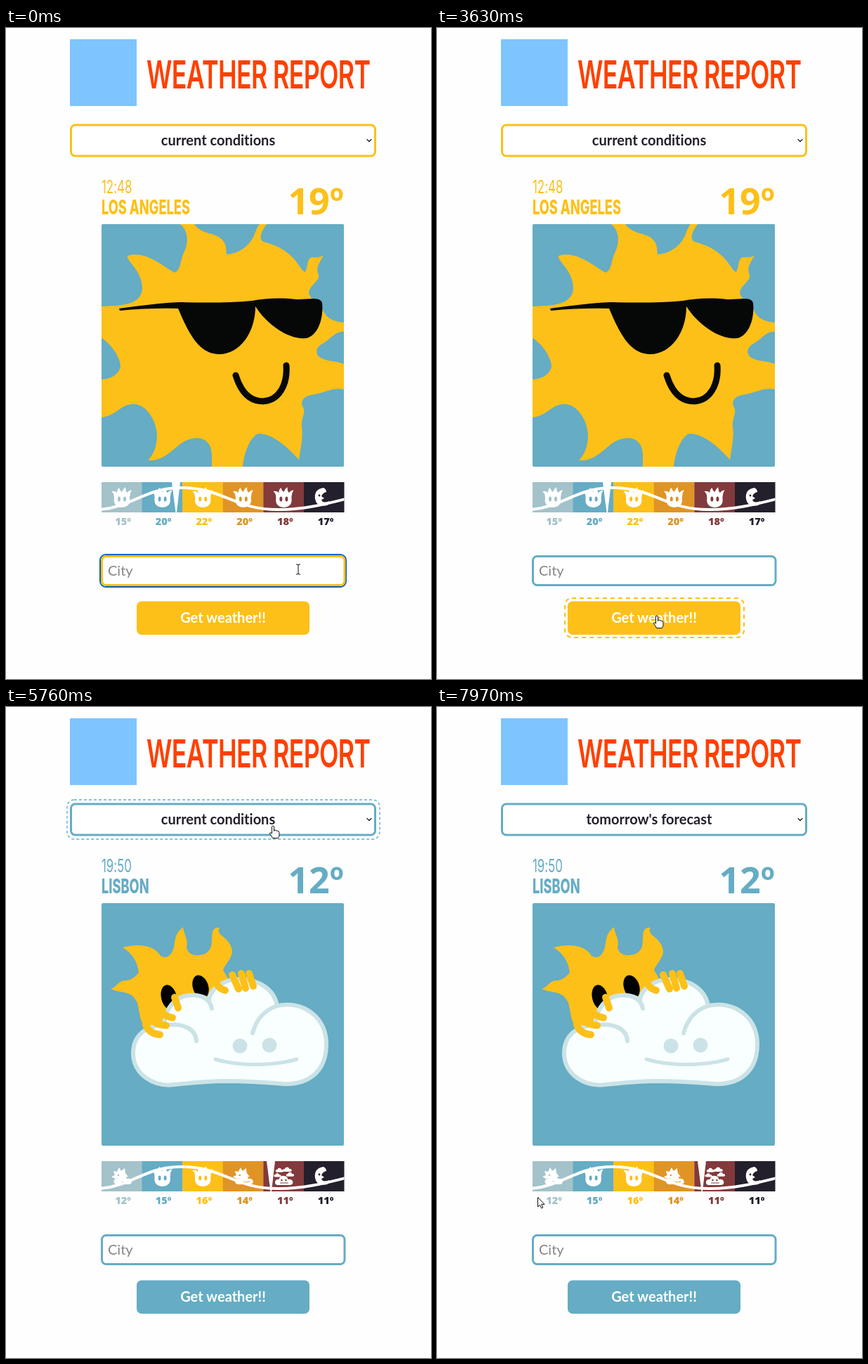
Recreate the animation shown at these times as an HTML page. Size 605 by 926 pixels, loop 8 s.

```html
<!DOCTYPE html>
<html lang="en">
<head>
<meta charset="utf-8">
<title>Weather Report</title>
<style>
  html, body { margin: 0; width: 100%; height: 100%; overflow: hidden; background: #fefefe; }
  svg { display: block; --accent: #fdc018; }
  text { font-family: Lato, sans-serif; font-variant-ligatures: none; white-space: pre; }
  .mid { text-anchor: middle; }
  /* condensed face */
  .narrow { font-family: Inter, sans-serif; transform: scaleX(.65); transform-box: fill-box; transform-origin: 0 0; }
  .title { font-size: 55px; font-weight: 600; letter-spacing: -1px; fill: #ff4000; }
  .clock { font-size: 26px; }
  .city { font-size: 28px; font-weight: 800; }
  .temp { font: 700 52px "Open Sans", sans-serif; text-anchor: end; }
  .small { font: 800 14.5px "Open Sans", sans-serif; text-anchor: middle; }
  .bold { font-weight: 700; font-size: 20px; }
  .item { font: 700 18px "Open Sans", sans-serif; }
  .accent { fill: var(--accent); }
  .frame { fill: #fff; stroke: var(--accent); stroke-width: 3; }
  .dash { fill: none; stroke: var(--accent); }
  .cursor path { fill: #fff; stroke: #111; stroke-linejoin: round; }
  .line { fill: none; stroke-linecap: round; }
</style>
</head>
<body>
<svg id="stage" width="605" height="926" viewBox="0 0 605 926">
  <defs>
    <clipPath id="card"><rect x="136" y="279" width="345" height="345" rx="2"/></clipPath>
    <clipPath id="strip"><rect x="136" y="646" width="345.5" height="43.5"/></clipPath>
    <g id="sun">
      <path fill="#fff" d="M-11 0Q-11-6-15-9Q-10-10-7-7Q-7-12-4-14Q-3-10 0-8Q2-13 5-15Q5-10 7-7Q10-10 14-11Q11-6 11 0Q13 13 0 14Q-13 13-11 0Z"/>
      <ellipse cx="-4" cy="2" rx="2" ry="3.6" fill="currentColor"/>
      <ellipse cx="4" cy="2" rx="2" ry="3.6" fill="currentColor"/>
    </g>
    <path id="puff" fill="#fff" d="M-9 6Q-14 5-12 0Q-10-3-7-2Q-5-8 0-7Q5-7 6-2Q12-3 13 2Q13 6 8 6Z"/>
    <g id="peek">
      <path fill="#fff" d="M-10 3L-15 0-10-2-12-8-7-7-4-13-1-8 4-12 5-5 9 0Z"/>
      <circle cx="-5" cy="-2" r="1.3" fill="currentColor"/>
      <use href="#puff" x="1" y="5"/>
      <path class="line" stroke="currentColor" d="M0 7Q5 9 9 7"/>
    </g>
    <g id="rain">
      <use href="#puff" transform="translate(-6-9)scale(.45)"/>
      <use href="#puff" transform="translate(5-10)scale(.5)"/>
      <use href="#puff" transform="translate(-9-2)scale(.4)"/>
      <use href="#puff" transform="translate(9-3)scale(.45)"/>
      <use href="#puff" y="6"/>
      <circle cx="-3" cy="5" r="1.3" fill="currentColor"/>
      <circle cx="3" cy="5" r="1.3" fill="currentColor"/>
      <path class="line" stroke="currentColor" d="M-5 9H6"/>
    </g>
    <g id="moon">
      <path fill="#fff" d="M3-14Q-11-12-9 2Q-7 14 8 11Q12 9 11 5Q2 9 0 3L4 1 0-2Q2-7 7-8Q7-12 3-14Z"/>
      <circle cx="-3" cy="-3" r="1.4" fill="currentColor"/>
    </g>
  </defs>

  <rect x="91" y="16" width="95" height="95" fill="#7ec4ff"/>
  <text class="narrow title" x="200" y="86">WEATHER REPORT</text>

  <rect id="pickDash" class="dash" x="87" y="132" width="445" height="56" rx="10"/>
  <rect class="frame" x="92.5" y="138" width="433" height="44" rx="6"/>
  <text id="choice" class="bold mid" x="302" y="167" fill="#241f2c"></text>
  <path class="line" stroke="#222" stroke-width="1.3" d="M514 158.500l3 3 3-3"/>

  <g id="report"></g>

  <rect id="ring" x="134" y="749" width="350" height="46" rx="8" fill="none" stroke="#0a5fc4" stroke-width="2"/>
  <rect id="field" class="frame" x="136.5" y="751.5" width="345.5" height="41" rx="6"/>
  <text id="entry" x="145" y="779" font-size="20"></text>
  <path id="caret" d="M197.500 762V784" stroke="#111"/>

  <rect id="goDash" class="dash" x="182" y="811" width="255" height="56" rx="10" stroke-width="2" stroke-dasharray="6 5"/>
  <g id="go">
    <rect class="accent" x="186" y="815.5" width="246" height="47.500" rx="7"/>
    <text class="bold mid" x="309" y="846" fill="#fff">Get weather!!</text>
  </g>

  <g id="menu">
    <rect x="92.500" y="186" width="436" height="82" rx="2" fill="#000" opacity=".2"/>
    <rect x="92" y="186" width="435.5" height="81" rx="2" fill="#000" opacity=".35"/>
    <rect x="90.500" y="184.500" width="435.5" height="80.500" rx="2" fill="#fff" stroke="#666"/>
    <rect class="row" x="91" y="187.500" width="434.500" height="37.500"/>
    <rect class="row" x="91" y="225" width="434.500" height="37.500"/>
    <text class="item" x="96" y="214">current conditions</text>
    <text class="item" x="96" y="251">tomorrow's forecast</text>
  </g>

  <g id="cursor" class="cursor">
    <path d="M.5.5V14L3.500 11.300 5.700 16 7.800 15 5.700 10.400H10Z"/>
    <path d="M-1.500 1Q0-1 1.500 1V7.500L2 6Q4 5.500 4.500 7Q6.500 6 7 8Q9 7.500 9 9.500V13Q9 15 7.500 17.500H-.5Q-1.500 15-4.500 11Q-4.500 8.500-1.500 11Z"/>
    <path style="fill:none" d="M-3-7H-1L0-6 1-7H3M0-6V6M-3 7H-1L0 6 1 7H3"/>
  </g>
</svg>

<script>
const $ = id => document.getElementById(id);
const YELLOW = [253, 192, 24], BLUE = [101, 172, 196];
const CELLS = ['#a3c2ca', '#65acc4', '#fdc018', '#e09425', '#823a3c', '#241f2c'];

const sunny = `
  <rect x="136" y="279" width="345" height="345" fill="#fdc018"/>
  <g fill="#65acc4">
    <path d="M248 279C259 288 261 304 253 320C248 330 249 345 240 348C222 338 198 316 173 324C170 330 194 345 194 370C193 394 165 395 136 396V279Z"/>
    <path d="M268 279C280 296 300 289 310 304C314 310 313 316 314 322C334 321 349 307 354 293Q357 284 361 279Z"/>
    <path d="M371 279C362 291 360 300 366 304C388 309 406 320 418 339Q423 347 426 347C431 338 428 327 436 326Q444 327 452 324C444 336 441 343 445 351C447 361 432 364 431 378L436 386L449 395C452 408 460 417 481 419V279Z"/>
    <path d="M481 432C468 431 462 443 449 450C440 455 441 464 446 468C456 475 470 473 481 478Z"/>
    <path d="M136 441C149 449 162 467 163 481C161 493 149 499 136 500Z"/>
    <path d="M136 554C158 551 163 535 181 535C202 535 215 562 215 580C215 596 209 608 202 615C226 617 239 596 254 588C276 577 293 586 293 608V624H136Z"/>
    <path d="M337 624C339 602 350 577 361 577C379 578 398 593 417 614C420 594 423 583 421 566C420 554 428 547 422 538C419 527 427 523 440 521C455 518 466 511 481 514V624Z"/>
  </g>
  <path fill="#050807" d="M161 399C190 395 220 391 247 390C285 391 320 391 350 388C368 385 387 383 413 386C428 387 447 381 450 391C452 408 447 435 429 441C405 445 372 423 355 396C355 433 333 465 302 464C274 463 260 434 245 399Q205 398 162 402Z"/>
  <path class="line" stroke="#050807" stroke-width="9" d="M327 494C335 520 349 531 366 531C388 530 401 508 399 480"/>`;

const cloudy = `
  <rect x="136" y="279" width="345" height="345" fill="#65acc4"/>
  <path fill="#fdc018" d="M149 401C160 397 159 389 172 389Q179 389 189 378C187 361 179 350 166 342C190 336 211 339 220 354Q228 359 234 352C244 341 235 326 252 313C253 324 260 330 257 342C259 354 273 355 283 351C299 343 289 325 296 316Q299 313 304 314C297 325 320 327 322 347C322 358 312 365 309 374L330 410 220 470 199 457C190 447 191 436 187 421C178 402 168 409 149 401Z"/>
  <ellipse cx="232" cy="413" rx="11" ry="18" transform="rotate(-14 232 413)"/>
  <ellipse cx="277" cy="398" rx="11" ry="17" transform="rotate(-18 277 398)"/>
  <g class="line" stroke="#cbe3e6" stroke-width="6">
    <path fill="#f9ffff" d="M240 537C212 541 181 524 181 492C181 468 199 452 225 453C227 424 245 409 267 410Q280 410 289 417C291 398 313 387 334 387C361 388 382 402 386 425C423 417 456 441 456 480C456 516 433 538 394 536C360 533 340 532 308 532C280 533 260 535 240 537Z"/>
    <path d="M225 453C249 449 270 456 271 475M267 410C282 411 291 418 293 429M386 425Q359 434 351 464"/>
    <path stroke-width="5" d="M298 501C330 511 380 511 414 501"/>
  </g>
  <circle cx="333" cy="482" r="10.500" fill="#cbe3e6"/>
  <circle cx="375" cy="481" r="10.500" fill="#cbe3e6"/>
  <g class="line" stroke="#fdc018" stroke-width="10">
    <path d="M199 452Q204 465 219 466M205 444Q214 452 228 453M218 429Q224 440 237 442M240 413L245 428"/>
    <path d="M298 389Q302 401 312 403M322 381L331 401M335 379L341 400M346 379L352 397"/>
  </g>`;

function report({ id, time, city, temp, scene, icons, temps, mark }) {
  const cell = (c, i) => {
    const x = 136 + i * 57.6;
    return `<rect x="${x}" y="646" width="58" height="43" fill="${c}"/>
      <use href="#${icons[i]}" x="${x + (i == 5 ? 25 : 29)}" y="668" color="${c}"/>`;
  };
  const label = (n, i) =>
    `<text class="small" x="${166.5 + i * 57.7}" y="707" fill="${CELLS[i]}">${n}º</text>`;
  return `<g id="${id}">
    <text class="narrow clock accent" x="136" y="235">${time}</text>
    <text class="narrow city accent" x="136" y="265">${city}</text>
    <text class="temp accent" x="481" y="265">${temp}º</text>
    <g clip-path="url(#card)">${scene}</g>
    <g clip-path="url(#strip)">${CELLS.map(cell).join('')}
      <path class="line" stroke="#fff" stroke-width="4" d="M134 685C180 681 198 654 250 654C310 654 325 686 390 685C425 685 455 677 483 670"/>
      <path fill="#fff" d="M${mark - 6} 646h12l-5 43h-1.500Z"/></g>
    ${temps.map(label).join('')}</g>`;
}

$('report').innerHTML = report({
  id: 'first', time: '12:48', city: 'LOS ANGELES', temp: 19, scene: sunny, mark: 242,
  icons: ['sun', 'sun', 'sun', 'sun', 'sun', 'moon'], temps: [15, 20, 22, 20, 18, 17]
}) + report({
  id: 'second', time: '19:50', city: 'LISBON', temp: 12, scene: cloudy, mark: 377,
  icons: ['peek', 'sun', 'sun', 'peek', 'rain', 'moon'], temps: [12, 15, 16, 14, 11, 11]
});

// pointer path: time, x, y
const MOVES = [
  [0, 416, 770], [1850, 416, 770], [2240, 368, 800], [2630, 315, 838], [2670, 313, 836],
  [5000, 313, 836], [5030, 314, 834], [5400, 345, 500], [5760, 380, 169], [5820, 383, 160],
  [6490, 383, 160], [6730, 249, 222], [6940, 206, 235], [7200, 206, 235], [7210, 212, 236],
  [7640, 212, 236], [7970, 143, 697], [8000, 143, 697]
];
const KEYS = [[240, 'l'], [470, 'i'], [580, 's'], [850, 'b'], [880, 'o'], [1040, 'n']];

const within = (t, a, b) => t >= a && t < b;
const clamp = v => Math.min(1, Math.max(0, v));
const show = (el, on) => el.style.display = on ? '' : 'none';

function pointer(t) {
  const i = MOVES.findIndex(m => m[0] > t);
  const [t0, x0, y0] = MOVES[i - 1], [t1, x1, y1] = MOVES[i];
  const k = (t - t0) / (t1 - t0);
  return [x0 + (x1 - x0) * k, y0 + (y1 - y0) * k];
}

const [arrow, hand, beam] = $('cursor').children;
const rows = document.querySelectorAll('.row'), items = document.querySelectorAll('.item');

function draw(t) {
  const [x, y] = pointer(t);
  const open = within(t, 6020, 7350);
  const onGo = within(x, 186, 432) && within(y, 815, 863);
  const onPick = !open && within(y, 136, 184);
  const onField = within(y, 750, 794) && t < 3040;

  $('cursor').setAttribute('transform', `translate(${Math.round(x)} ${Math.round(y)})`);
  show(hand, onGo || onPick);
  show(beam, onField);
  show(arrow, !onGo && !onPick && !onField);

  const mix = clamp((t - 3640) / 80);
  const rgb = YELLOW.map((v, i) => Math.round(v + (BLUE[i] - v) * mix));
  $('stage').style.setProperty('--accent', `rgb(${rgb})`);
  show($('first'), t < 3660);
  show($('second'), t >= 3660);

  const focus = t < 3040;
  const typed = focus ? KEYS.filter(k => k[0] <= t).map(k => k[1]).join('') : '';
  $('entry').textContent = typed || 'City';
  $('entry').setAttribute('fill', typed ? '#241f2c' : '#858585');
  $('field').style.stroke = focus ? '' : `rgb(${BLUE})`;
  show($('ring'), focus);
  show($('caret'), within(t, 1580, 2110) || within(t, 2610, 3040));

  const press = t < 3040 ? 0 : 1 - clamp((t - 3200) / 110);
  $('go').setAttribute('transform',
    `translate(309 ${839 - 3 * press}) scale(${1 + .35 * press}) translate(-309 -839)`);
  show($('goDash'), onGo && !press);

  const thin = t < 6490;
  show($('pickDash'), within(t, 5740, 7670));
  $('pickDash').setAttribute('stroke-width', thin ? 1.4 : 2);
  $('pickDash').setAttribute('stroke-dasharray', thin ? '4 3' : '6 5');
  $('choice').textContent = t < 7350 ? 'current conditions' : "tomorrow's forecast";

  show($('menu'), open);
  $('menu').style.opacity = clamp((t - 5980) / 200);
  const picked = y >= 225 ? 1 : 0;
  rows.forEach((r, i) => r.setAttribute('fill', i == picked ? '#53525f' : '#65acc4'));
  items.forEach((r, i) => r.setAttribute('fill', i == picked ? '#fff' : '#241f2c'));
}

function tick() {
  draw(performance.now() % 8000);
  requestAnimationFrame(tick);
}
tick();
</script>
</body>
</html>
```
